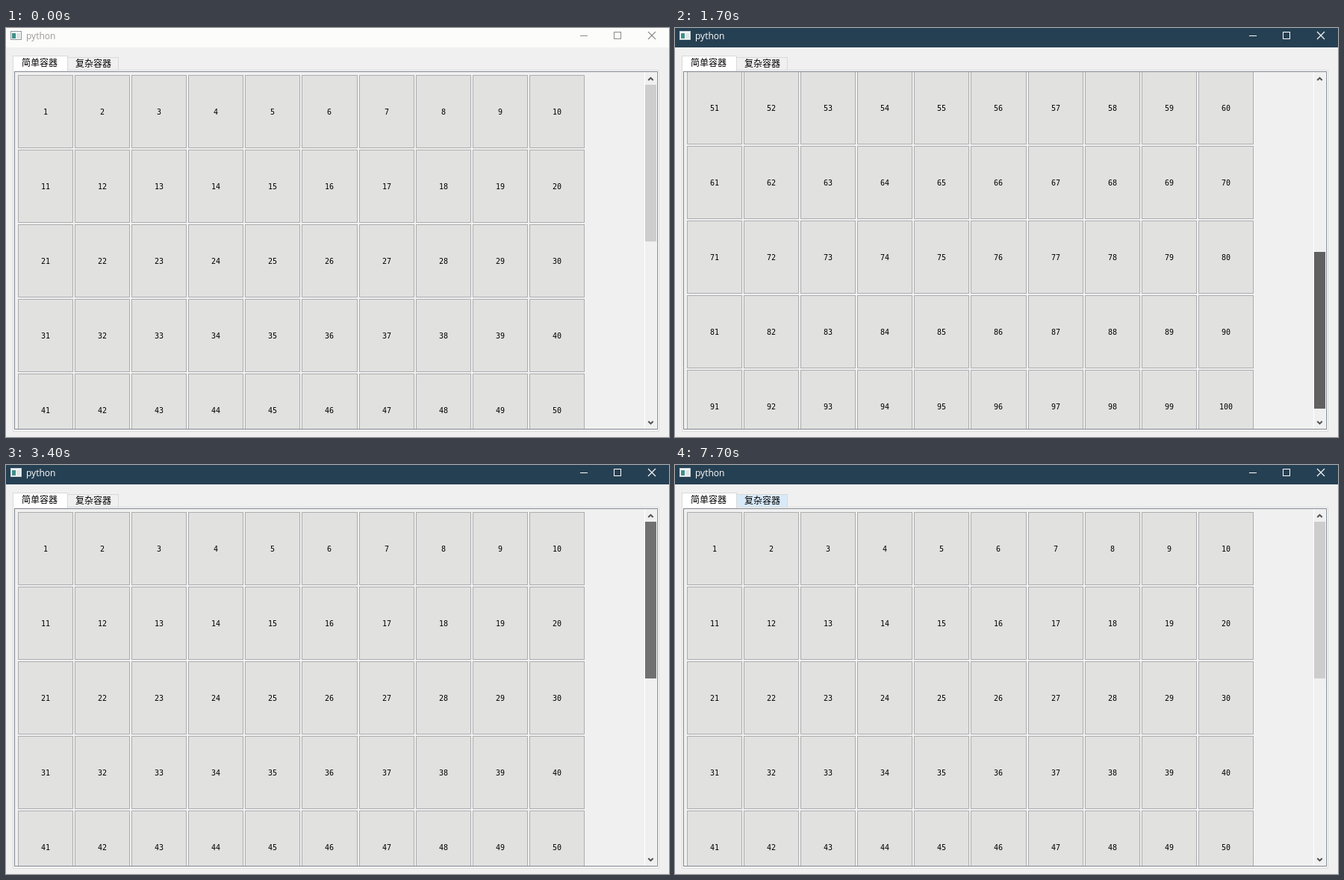
An HTML page with a canvas that plays this animation: 888x548 px, repeating every 8000 ms.

```html
<!DOCTYPE html>
<html lang="zh">
<head>
<meta charset="utf-8">
<title>python</title>
<style>
html, body { margin: 0; width: 100%; height: 100%; overflow: hidden; background: #f0f0f0; }
canvas { display: block; }
</style>
</head>
<body>
<canvas id="stage" width="888" height="548"></canvas>
<script>
const ctx = document.getElementById('stage').getContext('2d');
const LOOP = 8000, STEP = 100, MAX_SCROLL = 528;
const LABEL_FONT = '10px "DejaVu Sans Mono", monospace';
const TAB_FONT = '500 12px "Noto Sans CJK SC", "Noto Sans CJK", sans-serif';
const TITLE_FONT = '12px "Open Sans", sans-serif';

// The pointer rests between these moves: start, duration, target x and y.
const MOVES = [
  [3350, 850, 205, 240],
  [4700, 100, 205, 300],
  [6100, 100, 280, 320],
  [7300, 200, 115, 48]
];

const clamp = v => Math.max(0, Math.min(1, v));
const smoother = p => p * p * p * (p * (6 * p - 15) + 10);

function scrollAt(t) {
  const down = smoother(clamp((t - 930) / 940));
  const up = (1 - clamp((t - 2200) / 1000)) ** 1.84;
  return Math.round(MAX_SCROLL * down * up);
}

function pointerAt(t) {
  let x = 863, y = 90;
  for (const [start, duration, toX, toY] of MOVES) {
    const p = clamp((t - start) / duration);
    x += (toX - x) * p;
    y += (toY - y) * p;
  }
  return [x, y];
}

function buttonAt(t) {
  const [x, y] = pointerAt(t);
  if (x < 16 || x > 775 || y < 63) return 0;
  return 10 * Math.floor((y - 63) / 100) + Math.floor((x - 16) / 76) + 1;
}

// Buttons light up over three steps, and dim over two after a short hold.
function hoverLevels(t) {
  const levels = {};
  for (let s = t - 10 * STEP; s <= t; s += STEP) {
    const now = buttonAt(s), last = buttonAt(s - STEP);
    levels[now] ??= 0;
    for (const n in levels) {
      if (+n === now) levels[n] = clamp(levels[n] + 0.34);
      else if (+n !== last) levels[n] = clamp(levels[n] - 0.5);
    }
  }
  return levels;
}

function mix(a, b, p) {
  return `rgb(${a.map((v, i) => Math.round(v + (b[i] - v) * p))})`;
}

function rect(x, y, w, h, color) {
  ctx.fillStyle = color;
  ctx.fillRect(x, y, w, h);
}

function box(x, y, w, h, fill, border) {
  rect(x, y, w, h, border);
  rect(x + 1, y + 1, w - 2, h - 2, fill);
}

function line(points, color, width) {
  ctx.strokeStyle = color;
  ctx.lineWidth = width;
  ctx.beginPath();
  points.forEach(([x, y]) => ctx.lineTo(x, y));
  ctx.stroke();
}

function text(str, x, y, font, color) {
  ctx.font = font;
  ctx.fillStyle = color;
  ctx.fillText(str, x, y);
}

function drawTitle(active) {
  const ink = active ? '#ffffff' : '#8c8c8c';
  rect(0, 0, 888, 26, active ? '#264053' : '#fcfcfa');
  box(6, 4, 15, 12, '#f4f6f6', active ? '#c9d3d8' : '#8d9a9f');
  rect(8, 7, 5, 7, '#3f8f88');
  rect(14, 7, 5, 7, '#dfe5e5');
  text('python', 27, 15, TITLE_FONT, active ? '#ffffff' : '#9c9a9a');
  rect(769, 10, 10, 1, ink);
  ctx.strokeStyle = ink;
  ctx.lineWidth = 1;
  ctx.strokeRect(814.5, 5.5, 9, 9);
  line([[860, 5], [870, 15]], ink, 1.1);
  line([[870, 5], [860, 15]], ink, 1.1);
}

function drawTabs(t) {
  const [x, y] = pointerAt(t);
  const hot = x > 82 && x < 151 && y > 39 && y < 57;
  box(9, 56, 866, 485, '#f9f9f9', '#dcdcdc');
  box(82, 39, 69, 18, hot ? '#d8eaf9' : '#f0f0f0', '#d9d9d9');
  box(9, 37, 74, 21, '#ffffff', '#d9d9d9');
  rect(10, 56, 72, 2, '#ffffff');
  text('简单容器', 21, 51, TAB_FONT, '#000');
  text('复杂容器', 93, 52, TAB_FONT, '#000');
}

function drawGrid(offset, t) {
  const levels = hoverLevels(t);
  ctx.save();
  ctx.beginPath();
  ctx.rect(12, 59, 843, 478);
  ctx.clip();
  for (let i = 0; i < 100; i++) {
    const col = i % 10;
    const x = 16 + 76 * col + (col > 5 ? 1 : 0);
    const y = 63 + 100 * Math.floor(i / 10) - offset;
    const p = levels[i + 1] || 0;
    box(x, y, col === 5 ? 75 : 74, 98,
      mix([225, 225, 224], [229, 237, 247], p),
      mix([173, 173, 176], [24, 128, 208], p));
    const label = String(i + 1);
    text(label, x + 37 - 3 * label.length, y + 53, LABEL_FONT, '#000');
  }
  ctx.restore();
}

function thumbColor(t) {
  if (t < 600) return '#cdcdcd';
  if (t < 900) return '#a6a6a6';
  return mix([96, 96, 96], [205, 205, 205], clamp((t - 3300) / 700));
}

function drawScrollbar(offset, t) {
  rect(855, 59, 17, 478, '#ffffff');
  rect(856, 59, 15, 478, '#f0f0f0');
  rect(856, 76 + Math.round(offset * 234 / MAX_SCROLL), 15, 210, thumbColor(t));
  line([[860.3, 70], [863.5, 66.8], [866.7, 70]], '#505050', 2);
  line([[860.3, 527], [863.5, 530.2], [866.7, 527]], '#505050', 2);
}

function draw(t) {
  const offset = scrollAt(t);
  rect(0, 0, 888, 548, '#f0f0f0');
  drawTitle(t >= 900);
  drawTabs(t);
  box(11, 58, 862, 480, '#f0f0f0', '#828790');
  drawGrid(offset, t);
  drawScrollbar(offset, t);
}

const start = performance.now();
function tick() {
  const t = (performance.now() - start) % LOOP;
  draw(Math.floor(t / STEP) * STEP);
  requestAnimationFrame(tick);
}
tick();
</script>
</body>
</html>
```
